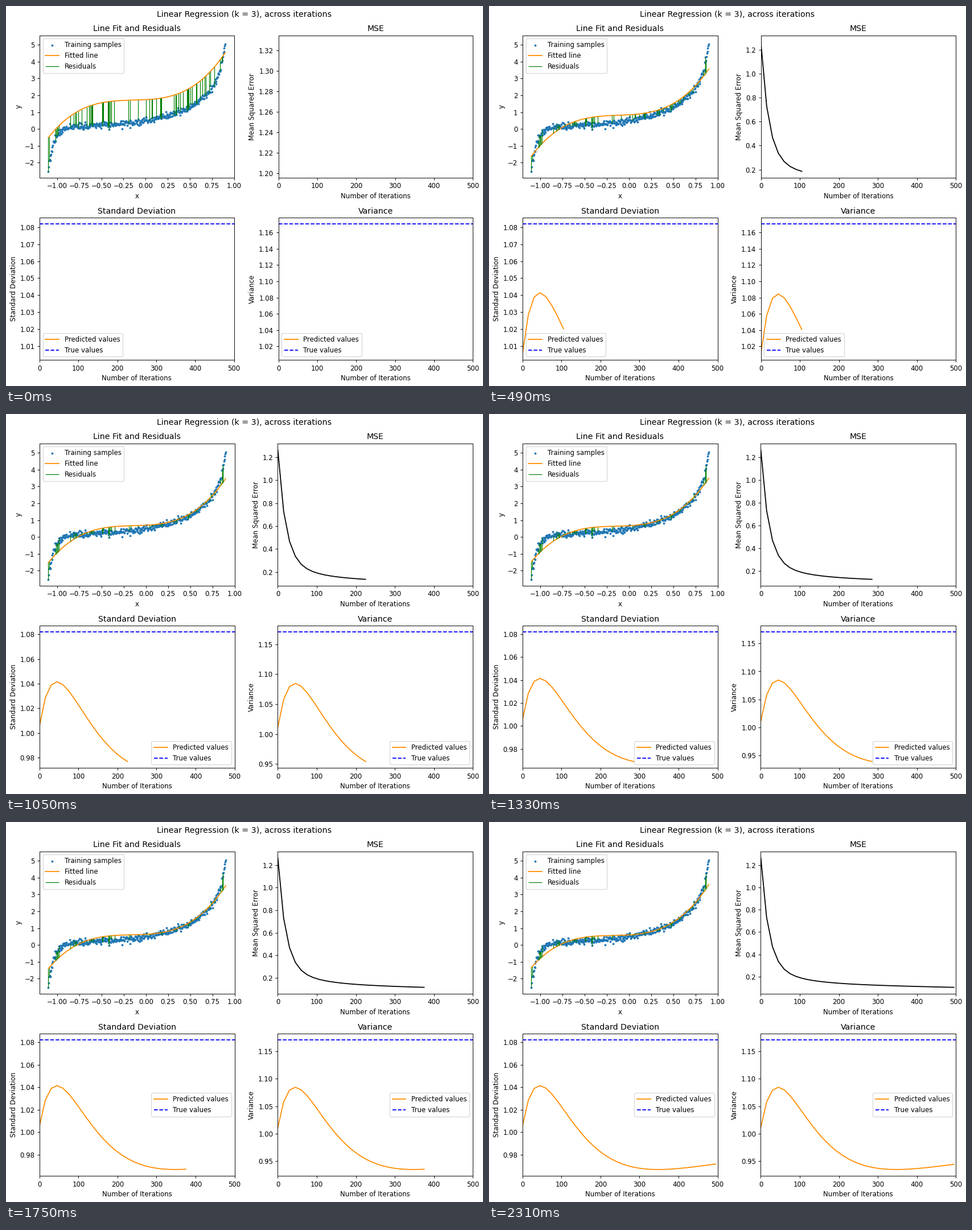
A matplotlib script for the animation above (2.38 s loop, 838 by 668 pixels).

```python
import numpy as np
import matplotlib.pyplot as plt
from matplotlib.animation import FuncAnimation

WIDTH, HEIGHT, DPI = 838, 668, 85
BLEED = 6  # pixels by which the layout area exceeds the stage on each side
FRAMES, INTERVAL, STEP = 34, 70, 15
RATE, MAX_ITER = 0.01, 500
TRUE_STD = 1.0819


def trend(x):
    """Gentle exponential growth with a steep bend at either end."""
    return (0.1 + 0.38 * np.exp(2.3 * x)
            + 2.0 * np.exp((x - 0.9) / 0.07)
            - 2.6 * np.exp(-(x + 1.1) / 0.06))


def descend(x, y):
    """Gradient descent on a cubic; one fitted curve per frame."""
    features = np.vander(x, 4, increasing=True)
    weights = np.array([1.74, 0.275, 1.0, 2.38])
    fits = []
    for i in range(FRAMES * STEP):
        if i % STEP == 0:
            fits.append(features @ weights)
        error = features @ weights - y
        weights = weights - RATE * 2 / x.size * features.T @ error
    return fits


def decays(t):
    return np.exp(-np.outer(t, [0, 1 / 20, 1 / 50, 1 / 120, 1 / 300, 1 / 800]))


rng = np.random.default_rng(4)
x = np.linspace(-1.1, 0.9, 400)
y = trend(x) + rng.normal(0, 0.1, x.size)
picked = np.append(0, rng.choice(x.size, 64, replace=False))
fits = descend(x, y)

iters = np.arange(FRAMES) * STEP
mse = (0.06 + 0.1 * np.exp(-iters / 600) + 0.185 * np.exp(-iters / 66)
       + 0.92 * np.exp(-iters / 19.3))

# Smooth sum of decays through a few key points
key_t = [0, 15, 45, 75, 150, 225, 285, 345, 495]
key_std = [1.0057, 1.0284, 1.0416, 1.0340, 0.9992, 0.9770, 0.9690, 0.9667,
           0.9718]
std = decays(iters) @ np.linalg.lstsq(decays(key_t), key_std, rcond=None)[0]

# The 0.01 guards against rounding down to one pixel less
fig, ((ax_fit, ax_mse), (ax_std, ax_var)) = plt.subplots(
    2, 2, figsize=((WIDTH + 0.01) / DPI, (HEIGHT + 0.01) / DPI), dpi=DPI)
fig.suptitle("Linear Regression (k = 3), across iterations",
             y=1 - 7.6 / HEIGHT)

ax_fit.scatter(x, y, s=5, label="Training samples")
fit_line, = ax_fit.plot(x, fits[0], color="darkorange", label="Fitted line")
residuals = ax_fit.vlines(x[picked], y[picked], fits[0][picked],
                          color="green", lw=1, label="Residuals")
ax_fit.set(title="Line Fit and Residuals", xlabel="x", ylabel="y",
           xlim=(-1.2, 1.0), ylim=(-2.905, 5.565))
ax_fit.legend(loc="upper left")


def history_line(ax, title, ylabel, color, true_value=None):
    line, = ax.plot([], [], color=color, label="Predicted values")
    if true_value is not None:
        ax.axhline(true_value, color="blue", ls="--", label="True values")
        ax.legend(loc="best")
    ax.set(title=title, xlabel="Number of Iterations", ylabel=ylabel,
           xlim=(0, MAX_ITER))
    return line


histories = [
    (history_line(ax_mse, "MSE", "Mean Squared Error", "black"), mse),
    (history_line(ax_std, "Standard Deviation", "Standard Deviation",
                  "darkorange", TRUE_STD), std),
    (history_line(ax_var, "Variance", "Variance",
                  "darkorange", TRUE_STD ** 2), std ** 2),
]


def update(frame):
    fit = fits[frame]
    fit_line.set_ydata(fit)
    residuals.set_segments([[(x[i], y[i]), (x[i], fit[i])] for i in picked])
    for line, values in histories:
        line.set_data(iters[:frame + 1], values[:frame + 1])
        line.axes.relim()
        line.axes.autoscale_view(scalex=False)
    dx, dy = BLEED / WIDTH, BLEED / HEIGHT
    fig.tight_layout(rect=(-dx, -dy, 1 + dx, 1 + dy))
    return [fit_line, residuals] + [line for line, _ in histories]


anim = FuncAnimation(fig, update, frames=FRAMES, interval=INTERVAL,
                     repeat=True, repeat_delay=0)
plt.show()
```
